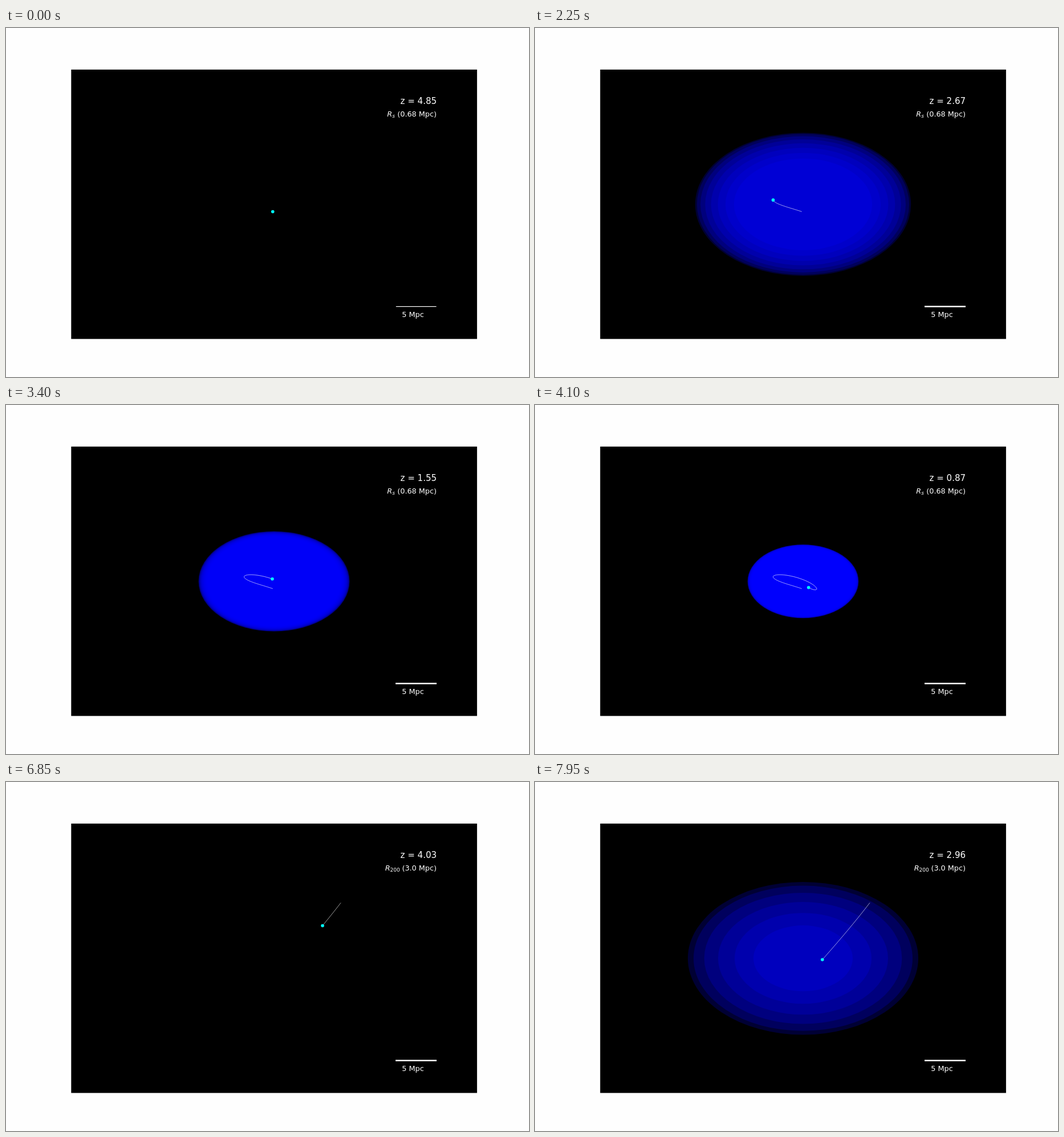
An HTML page for the animation above (8 s loop, 917 by 611 pixels).

```html
<!DOCTYPE html>
<html lang="en">
<head>
<meta charset="utf-8">
<title>Orbit in a collapsing halo</title>
<style>
  html, body { margin: 0; width: 100%; height: 100%; overflow: hidden; background: #fefefe; }
  svg { display: block; width: 917px; height: 611px; }
  text { fill: #fff; font: 12.8px "DejaVu Sans", sans-serif; }
  .big { font-size: 15px; }
  .sub { font-size: 9px; }
  .it { font-style: italic; }
  .end { text-anchor: end; }
</style>
</head>
<body>
<svg viewBox="0 0 917 611">
  <rect x="114.3" y="72.8" width="711.6" height="471.6"/>
  <g id="halo" fill="#00f"></g>
  <path id="trail" fill="none" stroke="#fff" stroke-width=".8" stroke-opacity=".9" stroke-linejoin="round"/>
  <circle id="dot" r="2.8" fill="#0ff"/>
  <text id="z" class="big end" x="755" y="132.7"></text>
  <text id="r" class="it" y="154.7">R</text>
  <text id="sub" class="sub" y="156.8"></text>
  <text id="size" class="end" x="755" y="154.7"></text>
  <rect id="glow" x="683" y="486.4" width="72" height="2.4" fill="#fff"/>
  <rect x="683.8" y="487" width="70.7" height="1.2" fill="#fff"/>
  <text x="694.3" y="506.4">5 Mpc</text>
</svg>
<script>
const STEP = 50, LOOP = 8000, RESTART = 120, LAST = 100;
const CX = 470, CY = 308.7, ASPECT = 0.662;
const $ = id => document.getElementById(id);

// shrinking, precessing ellipse; q counts half swings and speeds up
function bound(n) {
  const q = 0.505 * (1 - 0.9084 * n / LAST) ** -1.1;
  const phase = Math.PI * (q - 1);
  const tilt = (197 + 28 * (q - 1)) * Math.PI / 180;
  const along = 79 / (q + 0.5) * Math.cos(phase);
  const across = (4.5 * q ** -0.5 + 0.85 * q ** -4) * Math.sin(phase);
  return [
    CX + along * Math.cos(tilt) - across * Math.sin(tilt),
    CY + ASPECT * (along * Math.sin(tilt) + across * Math.cos(tilt))
  ];
}

// accelerating fall toward the centre
const infall = n => [587 - 1.688 * n - 0.0114 * n * n, 211.5 + 2.2 * n + 0.009 * n * n];

const runs = [
  { orbit: bound, x: 668.3, sub: 's', subX: 677.3, size: '(0.68 Mpc)' },
  { orbit: infall, x: 664.8, sub: '200', subX: 673.6, size: '(3.0 Mpc)' }
];

const discs = Array.from({ length: 30 }, () => {
  const d = document.createElementNS('http://www.w3.org/2000/svg', 'ellipse');
  d.setAttribute('cx', CX);
  d.setAttribute('cy', CY);
  return $('halo').appendChild(d);
});

// nested translucent discs: the halo peaks, shrinks and gains a sharper edge
function drawHalo(n) {
  const depth = 0.069 * Math.max(0, n - 19);
  const radius = 219.5 - Math.hypot(2.53 * (n - 34), 12);
  const edge = 115 * Math.min(1, (39 / n) ** 3.67);
  const count = Math.max(2, Math.round(4 * (n / 29) ** 1.6));
  const bend = Math.min(1.6, (n / 29) ** 1.4);
  discs.forEach((d, i) => {
    const on = depth > 0 && i < count;
    const rx = on ? radius - edge * (i / (count - 1)) ** bend : 0;
    d.setAttribute('rx', rx);
    d.setAttribute('ry', rx * ASPECT);
    d.setAttribute('fill-opacity', 1 - Math.exp(-depth / count));
  });
}

function drawOrbit(orbit, n) {
  const points = [];
  for (let s = 0; s <= n; s += 0.125) points.push(orbit(s).map(v => v.toFixed(2)).join(' '));
  $('trail').setAttribute('d', 'M' + points.join('L'));
  const [x, y] = orbit(n);
  $('dot').setAttribute('cx', x);
  $('dot').setAttribute('cy', y);
}

function drawLabels(run, n) {
  $('z').textContent = 'z = ' + (4.85 * (1 - (n % LAST) / LAST)).toFixed(2);
  $('r').setAttribute('x', run.x);
  $('sub').setAttribute('x', run.subX);
  $('sub').textContent = run.sub;
  $('sub').classList.toggle('it', run.sub === 's');
  $('size').textContent = run.size;
}

let shown = -1;
function tick() {
  const step = Math.floor(performance.now() % LOOP / STEP);
  if (step !== shown) {
    shown = step;
    const second = step >= RESTART;
    const run = runs[second ? 1 : 0];
    const n = second ? step - RESTART : Math.min(step, LAST);
    drawHalo(n);
    drawOrbit(run.orbit, n);
    drawLabels(run, n);
    $('glow').setAttribute('opacity', 1 - 0.8 ** step);
  }
  requestAnimationFrame(tick);
}
tick();
</script>
</body>
</html>
```
